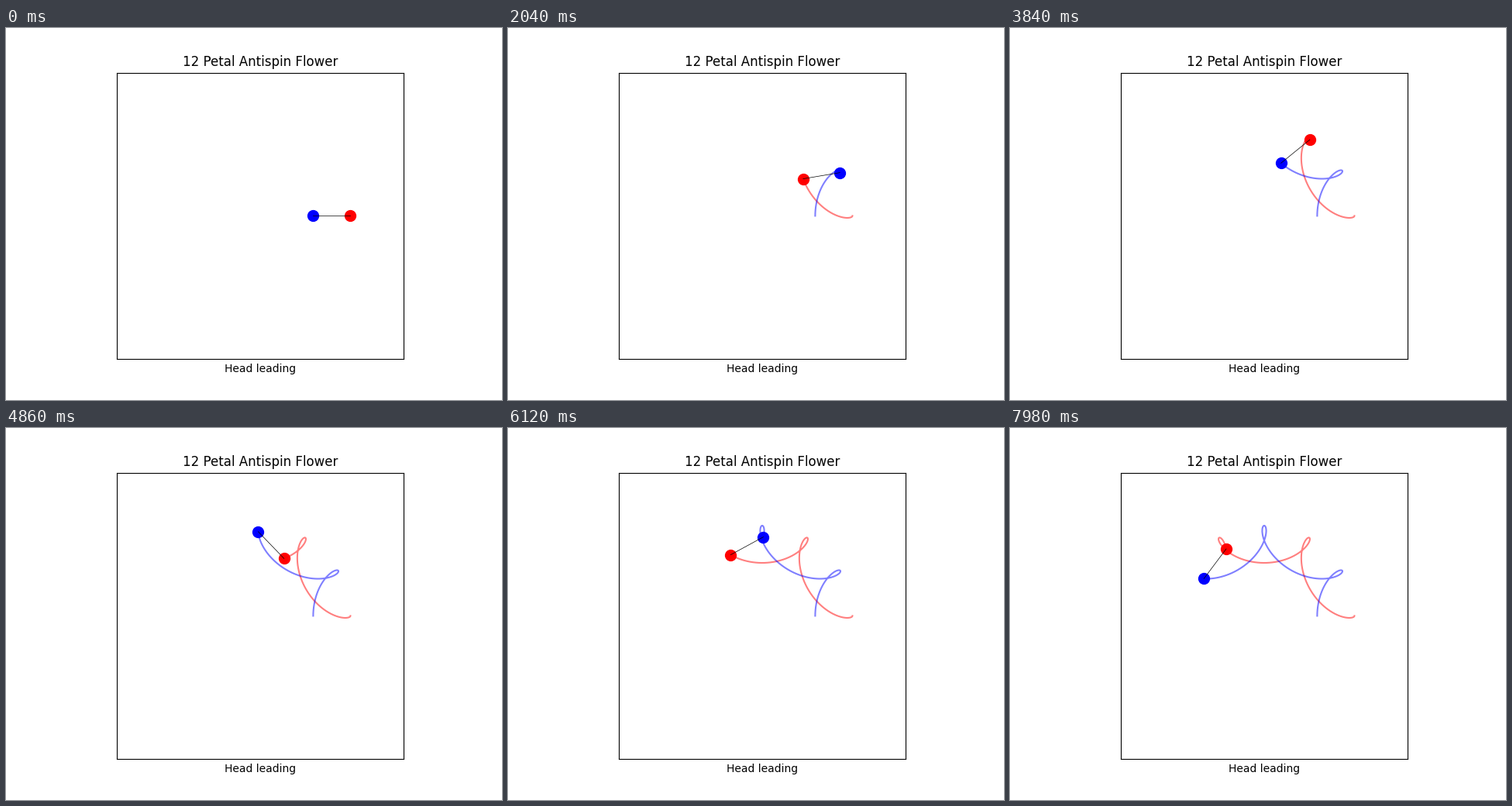
A matplotlib script for the animation above (8 s loop, 640 by 480 pixels).

```python
import numpy as np
import matplotlib.pyplot as plt
from matplotlib.animation import FuncAnimation

ARM = 1.0        # radius of the hand path
HALF = 0.26      # half the length of the staff
SPIN = -5        # staff turns per arm turn, against the arm
HOLD = 3         # ticks of 20 ms per step
TICKS = 400

theta = np.linspace(0, 2 * np.pi, 360)
hand = ARM * np.exp(1j * theta)
staff = HALF * np.exp(1j * SPIN * theta)
head, tail = hand + staff, hand - staff

fig, ax = plt.subplots(figsize=(6.4, 4.8), dpi=100)
ax.set_aspect("equal")
ax.set_xlim(-2, 2)
ax.set_ylim(-2, 2)
ax.set_xticks([])
ax.set_yticks([])
ax.set_title("12 Petal Antispin Flower")
ax.set_xlabel("Head leading")

ends = [(head, "red"), (tail, "blue")]
trails = [ax.plot([], [], color=c, lw=1.5, alpha=0.5)[0] for _, c in ends]
dots = [ax.plot([], [], "o", color=c, ms=10)[0] for _, c in ends]
rod, = ax.plot([], [], color="black", lw=0.5)


def put(line, points):
    line.set_data(points.real, points.imag)


def draw(tick):
    i = tick // HOLD
    for (path, _), trail, dot in zip(ends, trails, dots):
        put(trail, path[:i + 1])
        put(dot, path[i:i + 1])
    put(rod, np.array([head[i], tail[i]]))
    return [*trails, *dots, rod]


anim = FuncAnimation(fig, draw, frames=TICKS, interval=20,
                     repeat=True, repeat_delay=0, blit=False)
plt.show()
```
